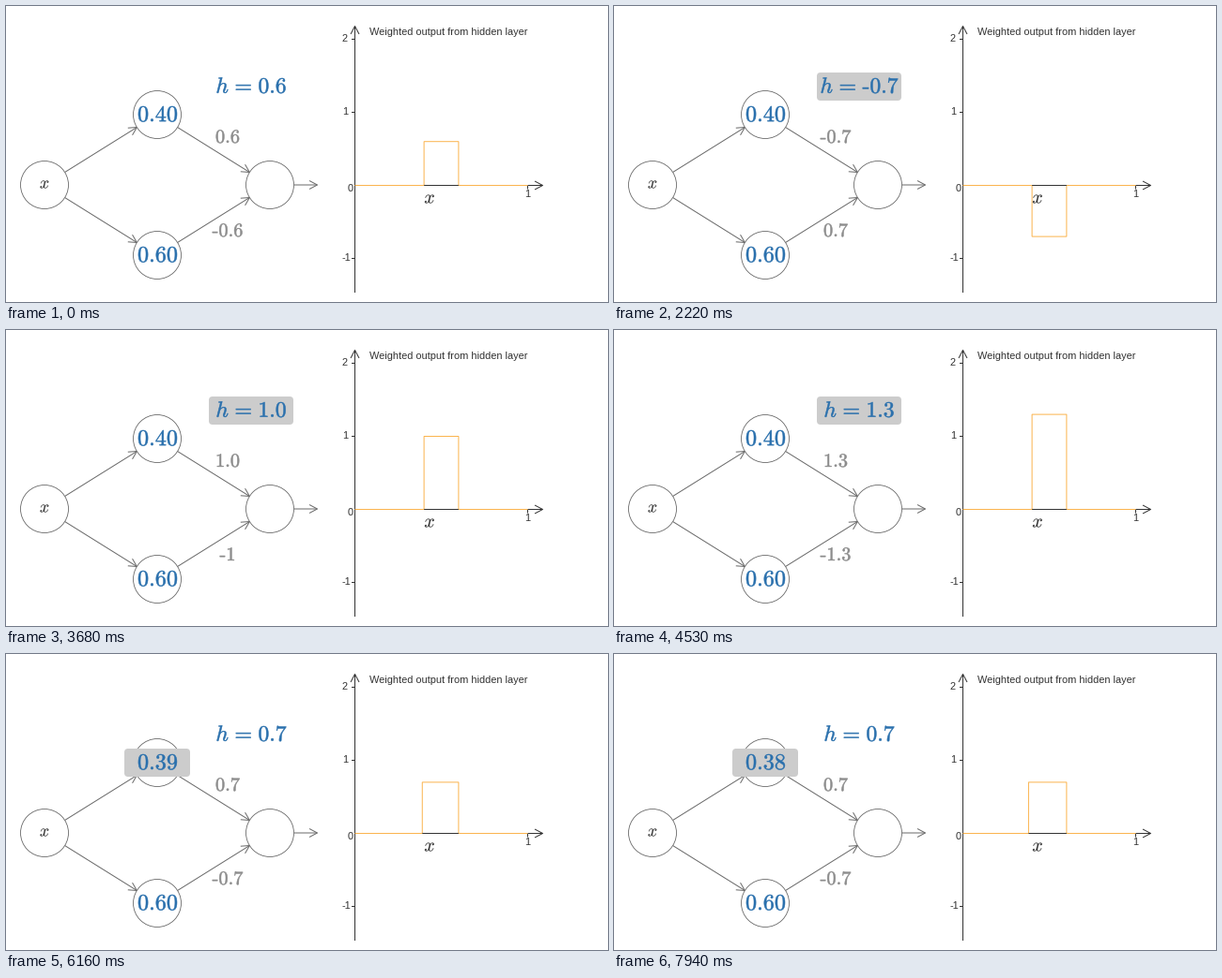
A matplotlib script that plays this animation: 641 by 316 pixels, repeating every 8000 ms.

```python
import numpy as np
import matplotlib.pyplot as plt
from matplotlib.animation import FuncAnimation
from matplotlib.patches import Circle, FancyBboxPatch, PathPatch
from matplotlib.path import Path
from matplotlib.textpath import TextPath
from matplotlib.transforms import Affine2D

W, H, DPI = 641, 316, 64
PT = 72 / DPI  # points per pixel
LOOP, STEP = 8000, 20
TICK = 76.7  # ms between two updates of a dragged value

BLUE, GREY, DARK = "#2a70ad", "#8c8c8c", "#333333"
WIRE, ORANGE, HIGHLIGHT = "#6a6a6a", "#fbb44e", "#cccccc"

plt.rcParams["mathtext.fontset"] = "cm"
plt.rcParams["font.family"] = "Liberation Sans"

fig = plt.figure(figsize=(W / DPI, H / DPI), dpi=DPI, facecolor="white")
ax = fig.add_axes([0, 0, 1, 1])
ax.set(xlim=(0, W), ylim=(H, 0))
ax.axis("off")


# ---- glyph paths, measured in em ----
def bar(x0, y0, x1, y1):
    return Path([(x0, y0), (x1, y0), (x1, y1), (x0, y1), (x0, y0)], closed=True)


def math(text, dx=0.0):
    path = TextPath((0, 0), f"${text}$", size=1)
    return Affine2D().translate(dx, 0).transform_path(path)


def number(text, dx=0.0):
    """Paths and advance width of a number with a hyphen as its sign."""
    paths, start = [], dx
    if text[0] == "-":
        paths.append(bar(dx + 0.011, 0.187, dx + 0.276, 0.245))
        dx += 0.333
        text = text[1:]
    paths.append(math(text, dx))
    width = sum(0.278 if c == "." else 0.5 for c in text)
    return paths, dx + width - start


def equation(value):
    paths, width = number(f"{value:.1f}", 1.910)
    equals = [bar(0.910, y, 1.576, y + 0.042) for y in (0.131, 0.327)]
    return [math("h"), *equals, *paths], 1.910 + width


class Label:
    def __init__(self, x, baseline, size, color, weight=0.5):
        self.x, self.baseline, self.size = x, baseline, size
        self.patch = ax.add_patch(PathPatch(
            bar(0, 0, 0, 0), fc=color, ec=color, lw=weight * PT, zorder=6))

    def set(self, paths, width):
        left = self.x - width * self.size / 2
        place = Affine2D().scale(self.size, -self.size).translate(left, self.baseline)
        self.patch.set_path(place.transform_path(Path.make_compound_path(*paths)))


# ---- static drawing ----
def line(points, color=WIRE, z=2):
    xs, ys = zip(*points)
    return ax.plot(xs, ys, color=color, lw=PT, zorder=z, snap=False,
                   solid_capstyle="butt", solid_joinstyle="miter")[0]


def arrow(start, end, color=WIRE, length=8.5, half=4.5):
    start, end = np.array(start, float), np.array(end, float)
    along = (end - start) / np.hypot(*(end - start))
    across = np.array([-along[1], along[0]])
    back = end - length * along
    line([start, end], color)
    line([back + half * across, end, back - half * across], color)


def caption(x, y, text, align="left"):
    ax.text(x, y, text, size=11 * PT, color=DARK, ha=align, va="baseline", zorder=4)


R = 25.5
source, upper, lower, sink = (41, 191), (161, 116), (161, 266), (281, 191)
for centre in (source, upper, lower, sink):
    ax.add_patch(Circle(centre, R, fc="white", ec=WIRE, lw=0.85 * PT, zorder=3))
for a, b in ((source, upper), (source, lower), (upper, sink), (lower, sink)):
    a, b = np.array(a), np.array(b)
    offset = R * (b - a) / np.hypot(*(b - a))
    arrow(a + offset, b - offset)
arrow((306.5, 191), (331.5, 191))

X0, Y0, X_UNIT, Y_UNIT = 371.5, 191.5, 184, 78
X1 = X0 + X_UNIT
arrow((X1, Y0), (571.5, Y0), DARK)
arrow((X0, 306), (X0, 21.5), DARK)
line([(X1, Y0), (X1, Y0 + 4)], DARK)
for v in (-1, 1, 2):
    y = Y0 - v * Y_UNIT
    line([(368, y), (371, y)], DARK)
    caption(367 if v < 0 else 364, y + 3, str(v), "right")
caption(370, 198, "0", "right")
caption(555, 204.5, "1", "center")
caption(387, 31, "Weighted output from hidden layer")

Label(41, 194.5, 18, DARK, 0.15).set([math("x")], 0.572)
Label(451, 210.5, 20, DARK, 0.15).set([math("x")], 0.572)
Label(161.5, 273.2, 24.2, BLUE).set(*number("0.60"))


# ---- moving parts ----
def highlight(x, y, w, h):
    r = 4
    box = FancyBboxPatch((x + r, y + r), w - 2 * r, h - 2 * r, fc=HIGHLIGHT,
                         ec="none", boxstyle=f"round,pad={r}", zorder=4)
    return ax.add_patch(box)


height_box = highlight(216, 71, 90, 30)
step_box = highlight(126, 101, 70, 30)
height_label = Label(261, 92.8, 23.6, BLUE)
step_label = Label(161.5, 123.2, 24.2, BLUE)
top_weight = Label(236, 146, 20.4, GREY)
bottom_weight = Label(236, 246, 20.4, GREY)
pulse = line([(0, 0)], ORANGE, 4)
base = line([(0, 0)], DARK, 5)

# Each drag: first update, last update, value reached
HEIGHT_DRAGS = [(1220, 1450, -0.1), (1760, 1840, -0.3), (1990, 2220, -0.7),
                (2300, 2530, -1.4), (2910, 3680, 1.0), (3760, 3990, 1.7),
                (4370, 4850, 0.7)]
STEP_DRAGS = [(6160, 6780, 0.22), (7100, 7560, 0.36),
              (7710, 7710, 0.37), (7940, 7940, 0.38)]


def dragged(t, value, drags, digits):
    for first, last, goal in drags:
        if t >= first:
            count = round((last - first) / TICK) + 1
            u = min(int((t - first) / TICK) + 1, count) / count
            value += (goal - value) * u * u * (3 - 2 * u)
    return round(value, digits) + 0.0


def glow(t, on, full, fade=LOOP, off=LOOP):
    return 0.7 * (on <= t < off) + 0.3 * (full <= t < fade)


def update(i):
    t = i * STEP + STEP / 2
    h = dragged(t, 0.6, HEIGHT_DRAGS, 1)
    s = dragged(t, 0.4, STEP_DRAGS, 2)

    height_box.set_alpha(glow(t, 530, 990, 5310, 5460))
    step_box.set_alpha(glow(t, 5610, 6160))
    height_label.set(*equation(h))
    step_label.set(*number(f"{s:.2f}"))
    top_weight.set(*number(f"{h:.1f}"))
    bottom_weight.set(*number(f"{0 - h:g}"))

    left, right = X0 + s * X_UNIT, X0 + 0.6 * X_UNIT
    y = Y0 - h * Y_UNIT
    pulse.set_data([X0, left, left, right, right, X1], [Y0, Y0, y, y, Y0, Y0])
    base.set_data([left, right], [Y0, Y0])
    return ()


anim = FuncAnimation(fig, update, frames=LOOP // STEP, interval=STEP,
                     repeat=True, repeat_delay=0, blit=False)
plt.show()
```
